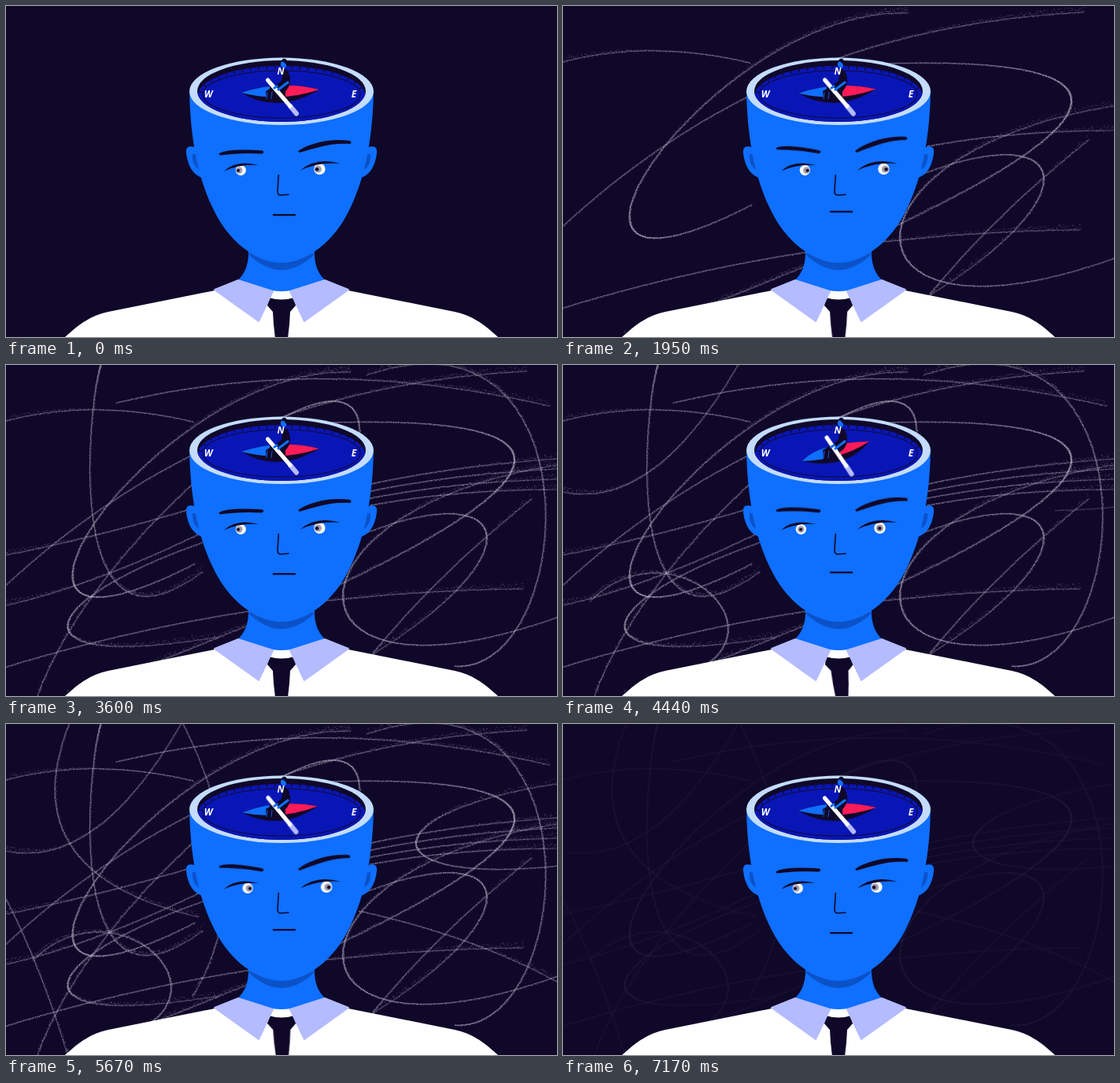
Write an HTML page with a canvas that moves like this. It is 700 by 420 pixels and loops after 7.2 s.

```html
<!DOCTYPE html>
<html lang="en">
<head>
<meta charset="utf-8">
<title>Inner compass</title>
<style>
  html, body { margin: 0; width: 100%; height: 100%; overflow: hidden; background: #100829; }
  canvas, svg { position: absolute; left: 0; top: 0; width: 700px; height: 420px; display: block; }
  svg { --ease: cubic-bezier(.37, 0, .63, 1); }
  .sway { animation: 900ms var(--ease) infinite alternate both; }
  .look { animation: 1800ms var(--ease) infinite alternate both; }
  .navy { fill: #100829; }
  .blue { fill: #0f6fff; }
  .shade { fill: #0b52c9; }
  .collar { fill: #b4bbff; stroke: #b4bbff; stroke-width: 2; stroke-linejoin: round; }
  .letters { font: italic 700 12px "Open Sans", "Noto Sans", sans-serif; fill: #fff; text-anchor: middle; }

  #tie { transform-origin: 350px 371px; animation-name: tie; }
  #paddle { transform-origin: 351px 116px; animation-name: paddle; }
  #hull { animation-name: hull; }
  #deck { animation-name: deck; }
  #browL { transform-origin: 327px 186px; animation-name: browL; }
  #browR { transform-origin: 372px 185px; animation-name: browR; }
  #mouth { animation-name: mouth; }
  .eye { animation-name: eye; }
  .iris { animation-name: iris; }
  .pupil { animation-name: pupil; }

  @keyframes tie { to { transform: skewX(5deg); } }
  @keyframes paddle { to { transform: rotate(6.4deg); } }
  @keyframes hull {
    from { d: path("M299 110 Q345 138 398 106 Q348 94 299 110Z"); }
    to { d: path("M304 122 Q360 134 389 97 Q325 99 304 122Z"); }
  }
  @keyframes deck {
    from { d: path("M299 110 Q348 123 398 106 Q348 94 299 110Z"); }
    to { d: path("M304 122 Q352 121 389 97 Q325 99 304 122Z"); }
  }
  @keyframes browL { to { transform: rotate(7.6deg); } }
  @keyframes browR { to { transform: rotate(-4.6deg); } }
  @keyframes mouth { to { transform: translateY(-4.2px); } }
  @keyframes eye { to { transform: translateX(9.2px); } }
  @keyframes iris { from { transform: translateX(-2px); } to { transform: translateX(2px); } }
  @keyframes pupil { from { transform: translateX(-1.3px); } to { transform: translateX(1.3px); } }
</style>
</head>
<body>
<canvas id="lines" width="700" height="420"></canvas>
<svg viewBox="0 0 700 420">
  <defs>
    <linearGradient id="paint">
      <stop offset=".36" stop-color="#0f6fff"/><stop offset=".36" stop-color="#100829"/>
      <stop offset=".57" stop-color="#100829"/><stop offset=".57" stop-color="#ff1b57"/>
    </linearGradient>
    <clipPath id="bowl"><ellipse cx="350" cy="108" rx="107" ry="39"/></clipPath>
    <!-- left halves, mirrored about x = 350 -->
    <g id="torso">
      <path fill="#fff" d="M75 420C95 402 108 393 130 388L280 358H351V420Z"/>
      <path class="blue" d="M308 308C309 330 302 342 293 349L338 361Q344 362 351 362V308Z"/>
    </g>
    <path id="flap" class="collar" d="M265 360L295 348L339 362L321 400Z"/>
    <g id="face">
      <path class="blue" d="M242 180C232 176 228 179 229 187C231 203 237 214 251 219Z"/>
      <path class="shade" d="M237 188C236 196 239 205 246 208L243 188Z"/>
      <path class="blue" d="M233 108C234 165 243 215 262 255C282 299 318 326 351 326V108Z"/>
    </g>
  </defs>

  <use href="#torso"/>
  <use href="#torso" transform="matrix(-1 0 0 1 700 0)"/>
  <path class="shade" d="M307 314Q350 356 393 314Z"/>
  <path id="tie" class="sway navy" d="M334 370Q350 375 366 370L368 380L361 388L360 404L358 422H342L340 404L339 388L332 380Z"/>
  <use href="#flap"/>
  <use href="#flap" transform="matrix(-1 0 0 1 700 0)"/>
  <use href="#face"/>
  <use href="#face" transform="matrix(-1 0 0 1 700 0)"/>

  <ellipse cx="350" cy="108.3" rx="117" ry="42.7" fill="#c3dcff"/>
  <g clip-path="url(#bowl)">
    <rect class="navy" x="240" y="60" width="220" height="95"/>
    <ellipse cx="350" cy="115" rx="107" ry="39" fill="#0916b6"/>
    <g fill="none" stroke="#100a3c">
      <ellipse cx="350" cy="112" rx="100" ry="30" stroke-width="1.2"/>
      <path d="M247 110A103 33 0 0 1 453 110" stroke-width="6" stroke-dasharray="1.5 9"/>
    </g>
  </g>

  <path id="hull" class="sway navy"/>
  <path id="deck" class="sway" fill="url(#paint)"/>
  <path class="navy" d="M352 79Q362 82 361 97Q359 109 347 112L344 120L331 121L330 108L342 101L350 95Z"/>
  <circle class="blue" cx="353" cy="74" r="4.2"/>
  <path class="navy" d="M350 70Q351 66 355 67Q359 70 357 77Q355 71 350 70Z"/>
  <path d="M332 109L331 118M338 109L337 118" fill="none" stroke="#0f6fff" stroke-width=".8"/>
  <g class="letters">
    <text x="257" y="115.5">W</text>
    <text x="349" y="87">N</text>
    <text x="442" y="115.5">E</text>
  </g>
  <g id="paddle" class="sway" fill="none" stroke-width="5" stroke-linecap="round">
    <path d="M361 127L369 136.5" stroke="#b4bbff" stroke-width="6"/>
    <path d="M332.5 94L361 127" stroke="#fff"/>
  </g>
  <path d="M358 97L346 106M341 104L344 102" fill="none" stroke="#0f6fff" stroke-width="3.2" stroke-linecap="round"/>

  <g class="eye look">
    <circle cx="298.3" cy="208.3" r="6.6" fill="#fff"/>
    <g class="iris look">
      <circle cx="298.3" cy="208.5" r="4.2" fill="#a39eae"/>
      <circle class="pupil look navy" cx="298.3" cy="208.7" r="2"/>
    </g>
  </g>
  <g class="eye look">
    <circle cx="398.4" cy="206.8" r="7.2" fill="#fff"/>
    <g class="iris look">
      <circle cx="398.4" cy="207" r="4.6" fill="#a39eae"/>
      <circle class="pupil look navy" cx="398.4" cy="207.3" r="2.2"/>
    </g>
  </g>
  <path class="blue" d="M285 204Q298 198 315 201.5L314 197H285ZM383 202Q398 195 416 199L415 194H384Z"/>
  <g class="navy">
    <path d="M277 209.5Q293 194.5 321 202Q297 200 277 209.5Z"/>
    <path d="M374 208.5Q394 191 425 200Q398 197.5 374 208.5Z"/>
    <path id="browL" class="look" d="M270 187.5C280 181.5 305 182 326 183.5Q329 186 325 187.5C305 186 288 187.5 272 189.5Z"/>
    <path id="browR" class="look" d="M371 184C386 174 412 167.5 437 171Q440 173.500 437 175C413 173 394 180 373 186Z"/>
  </g>
  <g fill="none" stroke="#100829" stroke-linecap="round">
    <path d="M346.3 214.5L345 235Q345 240 349 240L359 239.3" stroke-width="1.6"/>
    <path id="mouth" class="look" d="M340 265.2H367" stroke-width="2.3"/>
  </g>
</svg>
<script>
const LOOP = 7200, FADE_FROM = 6760, FADE_TO = 7220, DRAW = 330;
const ctx = document.getElementById('lines').getContext('2d');
const strokes = [];

let seed = 7;
const rand = () => (seed = (seed * 16807) % 2147483647) / 2147483647;
const mix = (a, b, u) => a + (b - a) * u;

// Point on a Bezier curve of any degree
function bezier(points, u) {
  if (points.length === 1) return points[0];
  const next = points.slice(1).map(([x, y], i) => [mix(points[i][0], x, u), mix(points[i][1], y, u)]);
  return bezier(next, u);
}

// Chalk line: thin core, grain spraying wider towards its end
function scribble(start, text) {
  const keys = text.split(' ').map(pair => pair.split(',').map(Number));
  const size = keys.slice(1).reduce((sum, [x, y], i) => sum + Math.hypot(x - keys[i][0], y - keys[i][1]), 0);
  const count = Math.ceil(size * .85);
  const pts = Array.from({ length: count }, (_, i) => bezier(keys, i / (count - 1)));
  const grain = pts.map(([x, y], i) => {
    const spread = 1.6 + 7 * (i / count) ** 3;
    return [0, 1].map(() => [x + (rand() - .5) * 2.5, y + .6 - spread * rand() ** 1.6]);
  });
  strokes.push({ start, pts, grain });
}

const wave = (start, gap, ...curves) => curves.forEach((c, i) => scribble(start + i * gap, c));

wave(30, 180,
  '700,320 337,450 337,183 700,127',
  '452,215 640,140 680,235 466,367',
  '465,367 545,268 668,170',
  '380,74 980,48 424,296 75,420');
wave(930, 220,
  '240,252 -102,427 190,0 438,9',
  '0,279 200,95 420,20 662,8',
  '238,72 110,42 0,71',
  '0,383 310,288 657,284');
// streaks fanning out beside the temple
for (let k = 0; k < 4; k++)
  scribble(1450 + 500 * k, `462,${178 - 9 * k} 570,${158 - 10 * k} 700,${158 - 13 * k}`);
// parallel sweeps on the left
for (let k = 0; k < 2; k++)
  scribble(2150 + 300 * k, `250,${178 + 34 * k} 110,${220 + 60 * k} 0,${241 + 64 * k}`);
wave(2000, 280,
  '120,0 106,41 66,400 250,262',
  '448,100 470,-72 120,200 40,420',
  '140,48 400,-15 690,52',
  '570,382 726,390 755,-90 458,13',
  '250,225 35,300 0,390 270,345');
wave(3700, 250,
  '130,402 310,356 143,192 34,300',
  '222,0 115,185 0,161');
wave(4400, 220,
  '700,180 461,205 461,112 700,76',
  '448,237 590,268 700,327',
  '80,0 5,190 245,245',
  '225,0 325,200 237,346',
  '0,222 45,310 78,420');

function drawStroke({ start, pts, grain }, t) {
  const p = Math.min(1, (t - start) / DRAW);
  if (p <= 0) return;
  const n = Math.floor(pts.length * p);
  const tone = .45 + .55 * p;
  ctx.globalAlpha = .3 * tone;
  ctx.beginPath();
  for (let i = 0; i < n; i++) ctx.lineTo(...pts[i]);
  ctx.stroke();
  ctx.globalAlpha = .23 * tone;
  for (let i = 0; i < n; i++)
    for (const [x, y] of grain[i]) ctx.fillRect(x, y, 1, 1);
}

let origin;
function frame(now) {
  origin ??= now;
  const t = (now - origin) % LOOP;
  ctx.clearRect(0, 0, 700, 420);
  ctx.strokeStyle = ctx.fillStyle = '#d2cee2';
  ctx.lineWidth = 1.1;
  ctx.canvas.style.opacity = Math.min(1, (FADE_TO - t) / (FADE_TO - FADE_FROM));
  for (const s of strokes) drawStroke(s, t);
  requestAnimationFrame(frame);
}
requestAnimationFrame(frame);
</script>
</body>
</html>
```
